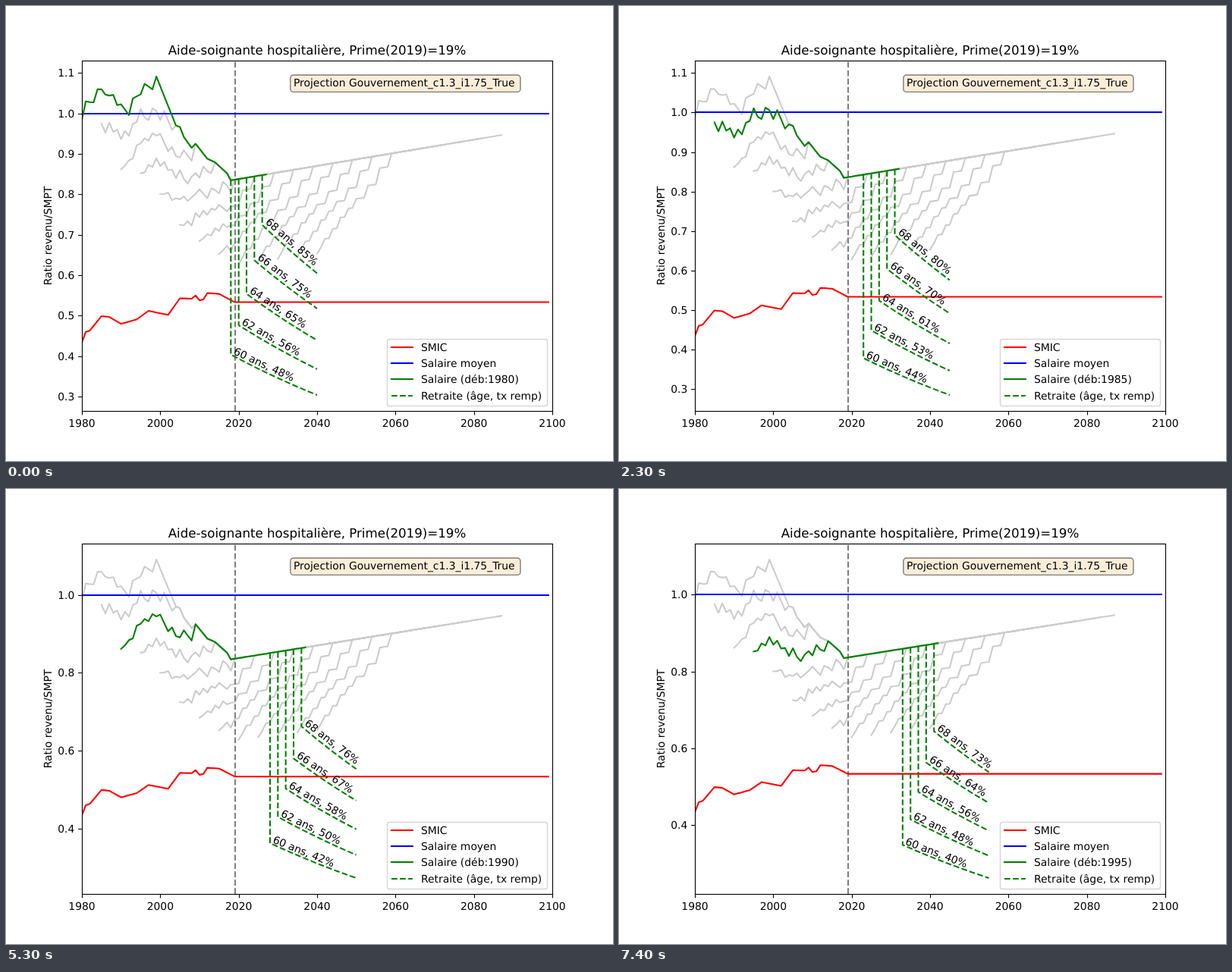
An HTML page for the animation above (8000 ms loop, 800 px wide and 600 px high).

```html
<!DOCTYPE html>
<html lang="fr">
<head>
<meta charset="utf-8">
<title>Aide-soignante hospitalière</title>
<style>
  html, body { margin: 0; width: 100%; height: 100%; overflow: hidden; background: #fff; }
  svg { display: block; width: 800px; height: 600px; }
  text { font: 13.89px "DejaVu Sans", sans-serif; text-rendering: geometricPrecision; }
  .title { font-size: 16.67px; }
  .mid { text-anchor: middle; }
  .end { text-anchor: end; }
  .line { fill: none; stroke-width: 2.083; stroke-linejoin: round; stroke-linecap: square; }
  .dash { stroke-dasharray: 7.71 3.33; stroke-linecap: butt; }
  .axis { fill: none; stroke: #000; stroke-width: 1.11; }
  .past { stroke: #ccc; }
  .now { stroke: #808080; }
  .smic { stroke: #f00; }
  .mean { stroke: #00f; }
  .pay { stroke: #008000; }

  .scene { visibility: hidden; animation: 8s step-end infinite; }
  .scene:nth-child(1) { animation-name: first; }
  .scene:nth-child(2) { animation-name: second; }
  .scene:nth-child(3) { animation-name: third; }
  .scene:nth-child(4) { animation-name: fourth; }
  @keyframes first { 0% { visibility: visible } 6.25%, 100% { visibility: hidden } }
  @keyframes second { 0%, 43.75%, 100% { visibility: hidden } 6.25% { visibility: visible } }
  @keyframes third { 0%, 81.25%, 100% { visibility: hidden } 43.75% { visibility: visible } }
  @keyframes fourth { 0% { visibility: hidden } 81.25%, 100% { visibility: visible } }
</style>
</head>
<body>
<svg viewBox="0 0 800 600">
  <clipPath id="plot"><rect x="100" y="72" width="620" height="462"/></clipPath>
  <g id="scenes"></g>
  <g id="frame">
    <rect class="axis" x="100.5" y="72.5" width="620" height="462"/>
    <text class="title mid" x="410" y="64">Aide-soignante hospitalière, Prime(2019)=19%</text>
    <text class="mid" transform="translate(59.5 303) rotate(-90)">Ratio revenu/SMPT</text>
    <rect x="374.8" y="91" width="303.2" height="22.4" rx="4.2" fill="#f5deb3" fill-opacity=".5"
          stroke="#000" stroke-opacity=".5" stroke-width="1.39"/>
    <text x="379" y="106">Projection Gouvernement_c1.3_i1.75_True</text>
  </g>
</svg>
<script>
const FIRST = 1980, LAST = 2099, CAREER = 47, GROWTH = 1.013, PEAK = 1.0911;

// Turning points [year, share of the mean wage]; straight lines between them
const TOP_PAY = [[1980, 1.313], [1981, 1.341], [1982, 1.301], [1985, 1.3], [1986, 1.24],
  [1987, 1.237], [1990, 1.149], [1992, 1.119], [1995, 1.136], [1996, 1.112], [1999, PEAK],
  [2004, .97], [2005, .9665], [2006, .942], [2008, .915], [2009, .925], [2012, .888],
  [2014, .879], [2017, .852], [2018, .8346], [2087, .9464]];
const SMIC = [[1980, .434], [1981, .46], [1982, .463], [1985, .499], [1987, .497], [1990, .48],
  [1994, .491], [1997, .512], [2002, .502], [2005, .543], [2008, .542], [2009, .55],
  [2010, .538], [2011, .54], [2012, .556], [2015, .554], [2019, .5335], [LAST, .5335]];

// Share of top pay at each grade
const GRADES = [.75, .768, .79, .815, .844, .866, .89, .922, .965, 1];

// Replacement rates at 60 and at 68
const SCENES = [
  { start: 1980, step: .1, rates: [.484, .855] },
  { start: 1985, step: .1, rates: [.449, .806] },
  { start: 1990, step: .2, rates: [.426, .767] },
  { start: 1995, step: .2, rates: [.406, .739] },
];

const range = (a, b, step = 1) =>
  Array.from({ length: Math.floor((b - a) / step + 1e-6) + 1 }, (_, i) => a + i * step);

function follow(keys, t) {
  const i = Math.max(1, keys.findIndex(k => k[0] >= t));
  const [t0, v0] = keys[i - 1], [t1, v1] = keys[i];
  return v0 + (v1 - v0) * (t - t0) / (t1 - t0);
}

// Promotions: yearly at first, then every two years, then every three
function grade(years) {
  if (years < 2) return years;
  if (years < 10) return 1 + Math.floor(years / 2);
  return Math.min(9, 6 + Math.floor((years - 10) / 3));
}

const topPay = t => follow(TOP_PAY, t);
const salary = (start, t) => topPay(t) * GRADES[grade(t - start)];
const px = t => 100 + (t - FIRST) * 620 / 120;
const snap = v => Math.round(v) + .5;

const path = (cls, pts) =>
  `<path class="line ${cls}" d="M${pts.map(p => p.map(v => v.toFixed(2)).join(" ")).join("L")}"/>`;
const tick = d => `<path class="axis" d="${d}"/>`;
const label = (x, y, s, cls = "") => `<text class="${cls}" x="${x}" y="${y}">${s}</text>`;

function scene({ start, step, rates: [from, to] }) {
  const end = start + 60;
  const pension = (rate, r, t) => rate * topPay(r) * GROWTH ** (r - t);
  const low = pension(from, start + 38, end);
  const py = v => 93 + (PEAK - v) * 420 / (PEAK - low);
  const curve = (cls, a, b, f) => path(cls, range(a, b).map(t => [px(t), py(f(t))]));
  const career = (cls, s) => curve(cls, s, s + CAREER, t => salary(s, t));

  let lines = range(1980, 2040, 5).filter(s => s !== start).map(s => career("past", s)).join("");
  lines += path("now dash", [[302, 534], [302, 72]]);
  lines += curve("smic", FIRST, LAST, t => follow(SMIC, t));
  const mean = Math.round(py(1));
  lines += path("mean", [[px(FIRST), mean], [px(LAST), mean]]);
  lines += career("pay", start);

  let texts = "";
  for (let i = 0; i < 5; i++) {
    const age = 60 + 2 * i, r = start + age - 22;
    const rate = from + (to - from) * i / 4 - .0026 * i * (4 - i);
    const pts = range(r, end).map(t => [px(t), py(pension(rate, r, t))]);
    lines += path("pay dash", [[px(r), py(topPay(r))], ...pts]);
    const [x, y] = pts[0], [x2, y2] = pts[pts.length - 1];
    const a = Math.atan2(y2 - y, x2 - x);
    const tx = x + 1.5 + 3 * Math.sin(a), ty = y - 10.5 * (1 - Math.cos(a));
    texts += `<text transform="translate(${tx} ${ty}) rotate(${a * 180 / Math.PI})">` +
      `${age} ans, ${Math.floor(rate * 100)}%</text>`;
  }

  const ticks = range(step === .1 ? .3 : .4, step === .1 ? 1.1 : 1, step).map(v =>
    tick(`M100 ${snap(py(v))}h-4.86`) + label(90.3, Math.round(py(v) + 5), v.toFixed(1), "end")).join("");
  return `<g class="scene"><g clip-path="url(#plot)">${lines}</g>${ticks}${texts}${legend(start)}</g>`;
}

function legend(start) {
  const rows = [
    ["smic", "SMIC", 450], ["mean", "Salaire moyen", 471],
    ["pay", `Salaire (déb:${start})`, 492], ["pay dash", "Retraite (âge, tx remp)", 514],
  ];
  return `<rect x="502.5" y="439.5" width="211" height="88" rx="2.8" fill="#fff" fill-opacity=".8"
    stroke="#ccc" stroke-opacity=".8" stroke-width="1.39"/>` +
    rows.map(([cls, s, y]) => path(cls, [[508, y], [535.8, y]]) + label(547, y + 5, s)).join("");
}

document.getElementById("scenes").innerHTML = SCENES.map(scene).join("");
document.getElementById("frame").insertAdjacentHTML("beforeend", range(1980, 2100, 20).map(t =>
  tick(`M${snap(px(t))} 534v5.4`) + label(px(t), 555, t, "mid")).join(""));
</script>
</body>
</html>
```
